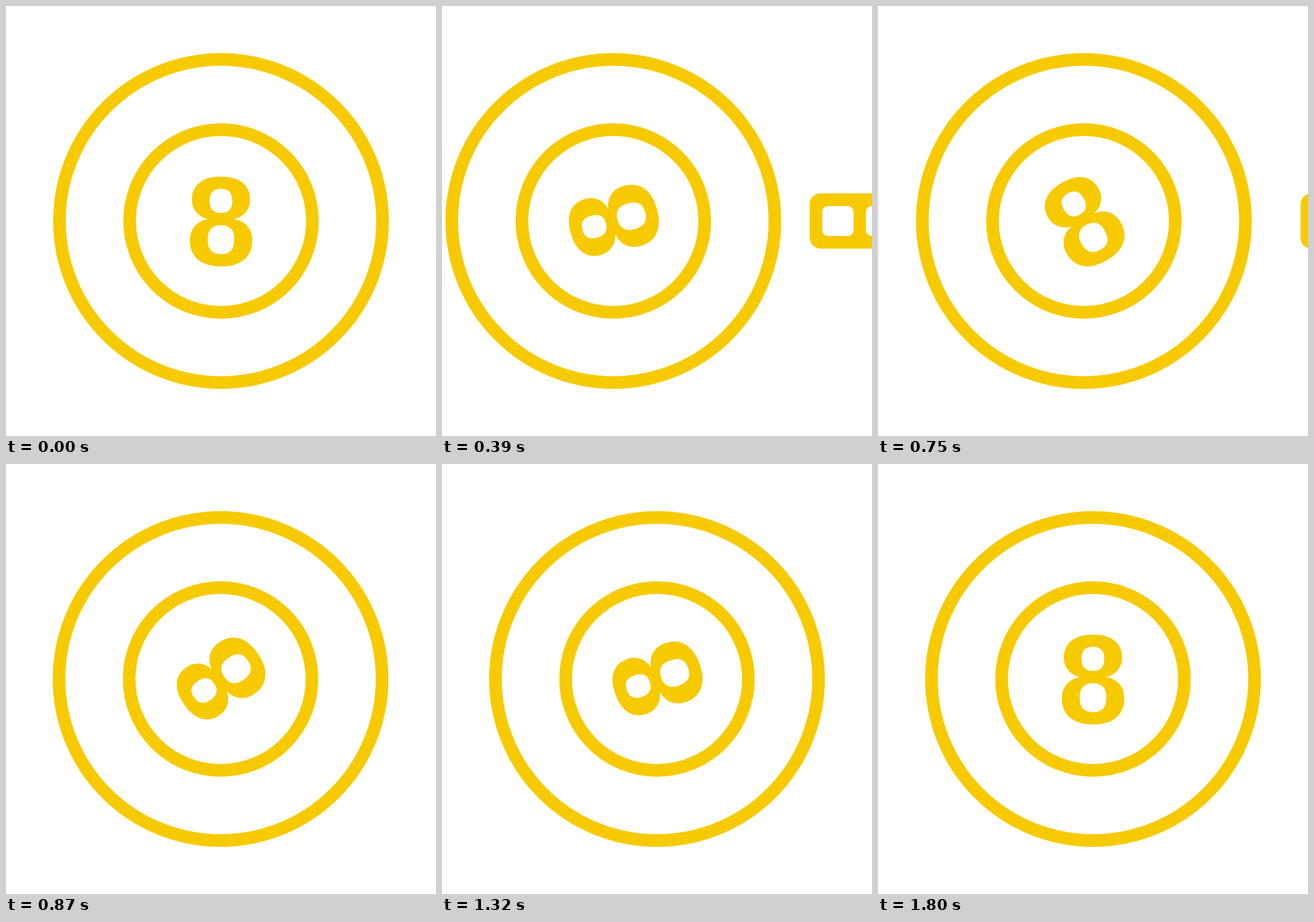
Recreate the animation shown at these times as an HTML page with a canvas. Size 748 by 748 pixels, loop 1.83 s.

```html
<!DOCTYPE html>
<html lang="en">
<head>
<meta charset="utf-8">
<title>Billiard ball</title>
<style>
  html, body { margin: 0; width: 100%; height: 100%; overflow: hidden; background: #fff; }
  canvas { display: block; width: 748px; height: 748px; }
</style>
</head>
<body>
<canvas id="stage" width="748" height="748"></canvas>
<script>
const ctx = document.getElementById('stage').getContext('2d');
const LOOP = 1830, STEP = 30, MID = 374, YELLOW = '#f7ca00';

// Progress between two times, with a soft start and stop
function ease(t, from, to) {
  const u = Math.min(1, Math.max(0, (t - from) / (to - from)));
  return u * u * (3 - 2 * u);
}

// Spin of the number: [time, degrees, degrees per ms]
const SPIN = [
  [150, 0, .2], [270, 38.4, .44], [390, 105.6, .68], [630, 295, .795],
  [870, 484.2, .78], [1320, 829.7, .72], [1800, 1080, 0]
];

function spin(t) {
  if (t <= 150 || t >= 1800) return 0;
  const i = SPIN.findIndex(k => k[0] > t);
  const [t0, a0, v0] = SPIN[i - 1], [t1, a1, v1] = SPIN[i];
  const d = t1 - t0, u = (t - t0) / d, w = 1 - u, s = u * u * (3 - 2 * u);
  return a0 + (a1 - a0) * s + d * u * w * (v0 * w - v1 * u);
}

function ring(x, r) {
  ctx.beginPath();
  ctx.arc(x, MID, r, 0, 2 * Math.PI);
  ctx.stroke();
}

function drawBall(x, degrees) {
  ring(x, 281);
  ring(x, 159);
  ctx.save();
  ctx.translate(x, MID + .5);
  ctx.rotate(-degrees * Math.PI / 180);
  const m = ctx.measureText('8');
  ctx.fillText('8', 0, (m.actualBoundingBoxAscent - m.actualBoundingBoxDescent) / 2);
  ctx.restore();
}

function drawCue(x) {
  ctx.beginPath();
  ctx.roundRect(x, 326, 400, 96, 19);
  ctx.roundRect(x + 22, 348, 54.5, 52, 10);
  ctx.roundRect(x + 98, 348, 280, 52, 10);
  ctx.fill('evenodd');
}

function draw(now) {
  const t = Math.floor(now % LOOP / STEP) * STEP;
  ctx.fillStyle = '#fff';
  ctx.fillRect(0, 0, 748, 748);
  ctx.fillStyle = ctx.strokeStyle = YELLOW;
  ctx.lineWidth = 22;
  ctx.font = 'bold 220px "Liberation Sans", Arial, sans-serif';
  ctx.textAlign = 'center';
  drawCue(753 - 125.5 * (ease(t, 150, 270) - ease(t, 270, 900)));
  drawBall(MID - 76 * (ease(t, 150, 390) - ease(t, 390, 900)), spin(t));
}

let start;
function tick(now) {
  start ??= now;
  draw(now - start);
  requestAnimationFrame(tick);
}
requestAnimationFrame(tick);
</script>
</body>
</html>
```
